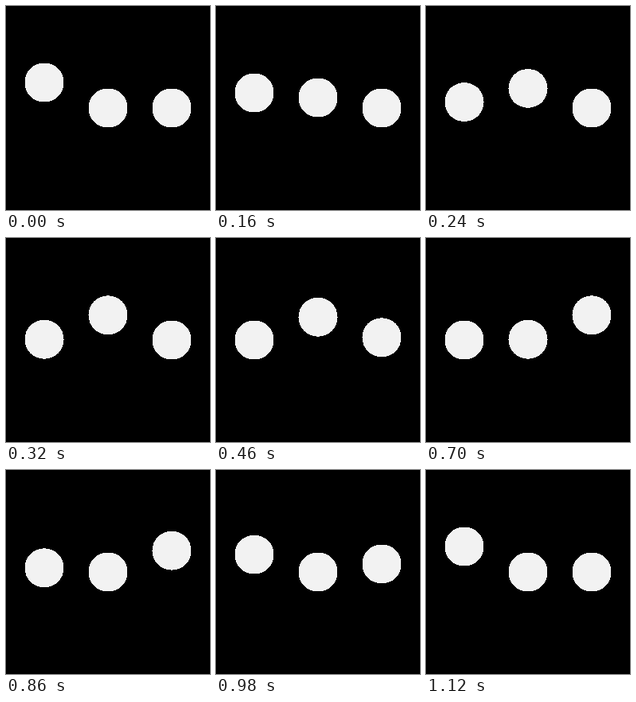
Animation of 256 by 256 pixels, one loop 1.22 s. Source, as an HTML page:

```html
<!DOCTYPE html>
<html lang="en">
<head>
<meta charset="utf-8">
<title>Bouncing dots</title>
<style>
  html, body { margin: 0; width: 100%; height: 100%; overflow: hidden; background: #000; }
  svg { display: block; width: 100%; height: 100%; }
</style>
</head>
<body>
<svg viewBox="0 0 256 256">
  <!-- Makes every touched edge pixel solid -->
  <filter id="hard" filterUnits="userSpaceOnUse" x="0" y="0" width="256" height="256"
          color-interpolation-filters="sRGB">
    <feComponentTransfer result="mask"><feFuncA type="linear" slope="60"/></feComponentTransfer>
    <feFlood flood-color="#f2f2f2"/>
    <feComposite operator="in" in2="mask"/>
  </filter>
  <g fill="#f2f2f2" filter="url(#hard)">
    <circle cx="48" cy="96" r="24"/>
    <circle cx="128" cy="128" r="24"/>
    <circle cx="208" cy="128" r="24"/>
  </g>
</svg>
<script>
  const LOOP = 1220, TICK = 20, LAST = 56;
  const SWAP = 19; // ticks per hand-over, both ends included
  const REST = 128, LIFT = 32;
  const dots = document.querySelectorAll("circle");

  // cubic-bezier(.42, 0, .58, 1)
  const bezier = (a, b, s) => 3 * a * s * (1 - s) ** 2 + 3 * b * s * s * (1 - s) + s ** 3;

  function ease(u) {
    if (u <= 0 || u >= 1) return u;
    let lo = 0, hi = 1;
    for (let i = 0; i < 30; i++) {
      const mid = (lo + hi) / 2;
      if (bezier(0.42, 0.58, mid) < u) lo = mid; else hi = mid;
    }
    return bezier(0, 1, lo);
  }

  function draw(ms) {
    const tick = Math.min(Math.floor((ms % LOOP) / TICK), LAST);
    const from = Math.floor(tick / SWAP);
    const to = (from + 1) % dots.length;
    const k = ease((tick % SWAP) / (SWAP - 1));
    dots.forEach((dot, i) => {
      const height = i === from ? 1 - k : i === to ? k : 0;
      dot.setAttribute("cy", REST - LIFT * height);
    });
  }

  const start = performance.now();
  function loop() {
    draw(performance.now() - start);
    requestAnimationFrame(loop);
  }
  loop();
</script>
</body>
</html>
```
